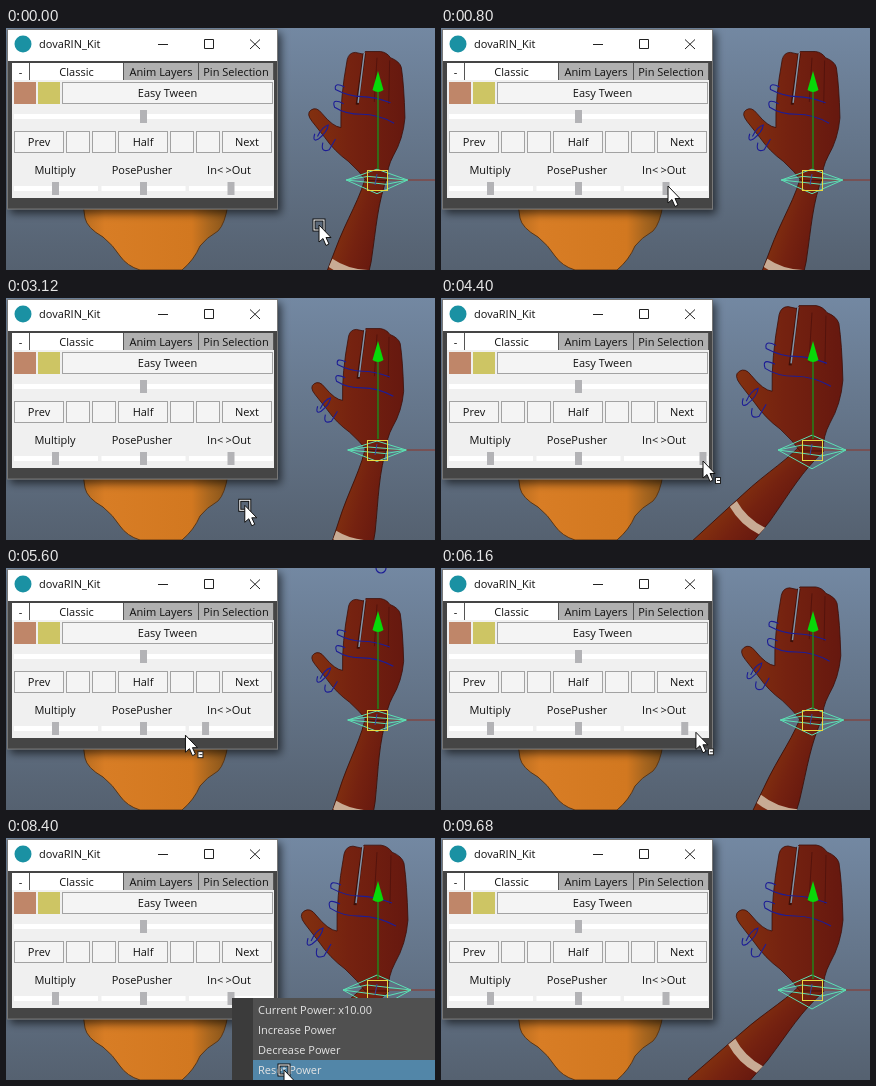
These frames come from a looping animation (429 by 242 pixels, 9.76 s). An HTML page:

```html
<!DOCTYPE html>
<html lang="en">
<head>
<meta charset="utf-8">
<title>Pose slider</title>
<style>
html, body { margin: 0; width: 100%; height: 100%; overflow: hidden; background: #64748a; }
svg { display: block; width: 100vw; height: 100vh; }
text { font: 11px "Open Sans", "Noto Sans", sans-serif; fill: #111; }
#labels text { text-anchor: middle; }
#menu text { fill: #e4e4e4; }
#hand path, #gizmo path { vector-effect: non-scaling-stroke; }
.limb { fill: url(#skin); stroke: #3c0f08; stroke-width: .8; }
.line { fill: none; }
</style>
</head>
<body>
<svg viewBox="0 0 429 242">
  <defs>
    <linearGradient id="sky" x2="0" y2="1">
      <stop stop-color="#7388a2"/><stop offset="1" stop-color="#556170"/>
    </linearGradient>
    <linearGradient id="skin">
      <stop stop-color="#82300f"/><stop offset=".45" stop-color="#752210"/><stop offset="1" stop-color="#66180f"/>
    </linearGradient>
    <linearGradient id="face">
      <stop stop-color="#b86c20"/><stop offset=".15" stop-color="#d87d25"/>
      <stop offset=".75" stop-color="#d27820"/><stop offset=".87" stop-color="#a8661f"/><stop offset="1" stop-color="#85531a"/>
    </linearGradient>
    <filter id="shadow" x="-10%" y="-10%" width="125%" height="125%">
      <feDropShadow dx="3" dy="4" stdDeviation="4" flood-opacity=".6"/>
    </filter>
  </defs>
  <rect width="429" height="242" fill="url(#sky)"/>

  <path d="M77 176L79 190Q81 200 97 209Q107 217 114 228Q121 238 134 242H176Q188 232 194 218Q200 210 212 203Q219 196 222 176Z"
    fill="url(#face)" stroke="#5c3715"/>

  <g id="arm">
    <path class="limb" d="M-11 -8C-9 22 -17 45 -19 80L-24 150H24L19 80C14 45 8 22 10 -8Z"/>
    <path d="M-19 88Q0 94 20 88L20 97Q0 103 -20 97Z" fill="#c8ab94"/>
  </g>
  <g id="hand">
    <path class="limb" d="M359 153Q352 143 339 131Q324 120 313 104L299 86Q292 77 298 73Q304 69 310 77Q322 92 331 93
      Q330 60 338 16Q340 8 347 8L356 10L358 7H375Q382 8 386 14Q396 18 398 25Q401 45 402 82Q400 106 389 125Q382 138 382 153Z"/>
    <path class="line" d="M371 14L368 64M385 17L384 66" stroke="#54130c"/>
    <path class="line" d="M357 9L349 67" stroke="#3c0f08" stroke-width="3"/>
    <path class="line" d="M357 8L350 65" stroke="#8394a8" stroke-width="1.5"/>
    <path class="line" stroke="#1c1c96" stroke-width="1.1" d="M335 47Q323 41 325 50Q340 58 354 58T386 65
      M334 66Q320 59 324 70Q336 78 354 78T390 88
      M302 100Q299 110 306 106Q316 98 317 90Q310 92 305 103M311 110Q308 122 318 118L325 106"/>
  </g>
  <circle id="farRing" cx="375" r="5" fill="none" stroke="#1c1c96" stroke-width="1.2"/>

  <path d="M382 152H429" stroke="#8e3429" stroke-width="1.2"/>
  <g id="gizmo" class="line" stroke="#5ce0b4">
    <path d="M-34 0L0 -15L34 0L0 19ZL-10 -5L34 0L10 6Z"/>
  </g>
  <path d="M372 62V141" stroke="#1d8c1c" stroke-width="1.4"/>
  <path d="M372 43L377.500 62Q372 66 366.500 62Z" fill="#08d808"/>
  <path d="M371 146L369 157" stroke="#3346a0"/>
  <rect x="361.500" y="142.500" width="20" height="20" fill="none" stroke="#e8da42"/>

  <rect x="1.500" y="1.500" width="270" height="179.500" fill="#444" stroke="#777" filter="url(#shadow)"/>
  <rect x="2" y="2" width="269" height="31" fill="#fff"/>
  <circle cx="17" cy="16" r="8.500" fill="#1a91a3"/>
  <text x="33" y="20">dovaRIN_Kit</text>
  <path d="M152 16.500H162M198.500 11.500H207.500V20.500H198.500ZM244 11.500L254 21M254 11.500L244 21" fill="none" stroke="#222"/>
  <rect x="6" y="35" width="262" height="135" fill="#f0f0f0"/>
  <g id="labels"></g>
  <rect id="thumb" y="154" width="7" height="13" fill="#b3b3b6"/>

  <g id="menu">
    <rect x="226" y="160" width="203" height="82" fill="#505050"/>
    <rect x="226" y="160" width="21" height="82" fill="#3b3b3b"/>
    <rect id="hover" x="247" width="182" height="20" fill="#5286a8"/>
    <text x="252" y="176">Current Power: x10.00</text>
    <text x="252" y="196">Increase Power</text>
    <text x="252" y="216">Decrease Power</text>
    <text x="252" y="236">Reset Power</text>
  </g>

  <g id="cursor">
    <g id="selectBox" fill="none">
      <rect x="-5" y="-5" width="10" height="10" stroke="#111" stroke-width="3"/>
      <rect x="-5" y="-5" width="10" height="10" stroke="#fff"/>
    </g>
    <path d="M0 0V17L4 13.500L7 20.500L10 19L7 12.500H12Z" fill="#fff" stroke="#111"/>
    <g id="dragBadge">
      <rect x="12.500" y="16.500" width="5" height="6" fill="#fff" stroke="#222"/>
      <path d="M14 19.500H17" stroke="#222"/>
    </g>
  </g>
</svg>
<script>
const el = Object.fromEntries([...document.querySelectorAll("[id]")].map(e => [e.id, e]));
const LOOP = 9760, STEP = 80, CENTER = 225, REACH = 38, LAG = 40, MOVE = 480;

// Cursor stops: arrival time, x, y. It waits at each stop until the next move must begin.
const stops = [
  [0,313,197], [720,227,158], [1280,164,166], [1760,210,166], [2080,166,168], [3040,240,212], [3480,226,158],
  [4240,262,163], [5000,129,168], [5400,250,166], [5760,129,168], [6240,265,164], [6520,172,166], [6760,270,165],
  [7240,226,160], [7740,278,232], [8880,226,160], [9120,180,165], [9400,240,165], [9680,440,262]
];
// Each drag pulls the pose from where it was towards 0 (left) or 1 (right).
const drags = [
  { start: 880, end: 2560, from: .3, power: 1 },
  { start: 3600, end: 6760, from: 0, power: 1 },
  { start: 8880, end: 9440, from: 1, power: .3 }
];

const mix = (a, b, k) => a + (b - a) * k;
const clamp = (v, low, high) => Math.min(high, Math.max(low, v));
const show = (node, on) => node.style.display = on ? "" : "none";
const place = (node, transform) => node.setAttribute("transform", transform);

function cursorAt(t) {
  const i = stops.findIndex(stop => stop[0] > t);
  if (i < 0) return stops.at(-1).slice(1);
  const [a, b] = [stops[i - 1], stops[i]];
  const u = Math.max(0, 1 - (b[0] - t) / Math.min(MOVE, b[0] - a[0]));
  const k = u * u * (3 - 2 * u);
  return [mix(a[1], b[1], k), mix(a[2], b[2], k)];
}

function dragAt(t) {
  const drag = drags.findLast(d => d.start <= t);
  if (!drag) return { pose: drags[0].from, slider: CENTER, active: false };
  const [x] = cursorAt(Math.min(t, drag.end) - LAG);
  const u = clamp((x - CENTER) / REACH, -1, 1);
  return {
    pose: mix(drag.from, u < 0 ? 0 : 1, Math.abs(u) * drag.power),
    slider: t < drag.end + STEP ? CENTER + u * REACH : CENTER,
    active: t <= drag.end
  };
}

const add = svg => el.labels.insertAdjacentHTML("beforeend", svg);
const box = (x, y, w, h, fill, stroke = "none") =>
  add(`<rect x="${x}" y="${y}" width="${w}" height="${h}" fill="${fill}" stroke="${stroke}"/>`);
const label = (text, x, y) => add(`<text x="${x}" y="${y}">${text}</text>`);

function button(text, x, y, width) {
  box(x + .5, y + .5, width - 1, 21, "#f4f4f4", "#a2a2a2");
  label(text, x + width / 2, y + 15);
}
function tab(text, x, width, fill) {
  box(x, 35, width, 17, fill);
  box(x + width, 35, 1, 17, "#555");
  label(text, x + width / 2, 48);
}
function slider(x, y, width, thumbX) {
  box(x, y + 4, width, 5, "#fff");
  if (thumbX) box(thumbX, y, 7, 13, "#b3b3b6");
}

tab("-", 6, 17, "#fff");
tab("Classic", 24, 93, "#fff");
tab("Anim Layers", 118, 74, "#b0b0b0");
tab("Pin Selection", 193, 74, "#b0b0b0");
box(8, 54, 22, 22, "#bf8669");
box(32, 54, 22, 22, "#cdc564");
button("Easy Tween", 56, 54, 211);
slider(8, 82, 259, 134);

let left = 8;
for (const text of ["Prev", "", "", "Half", "", "", "Next"]) {
  const width = text ? 50 : 24;
  button(text, left, 103, width);
  left += width + 2;
}
["Multiply", "PosePusher", "In&lt;&#8201;&gt;Out"].forEach((text, i) => {
  label(text, 49 + 87 * i, 146);
  slider(8 + 87.5 * i, 154, 84, i < 2 && 46 + 88 * i);
});

function draw(t) {
  const [x, y] = cursorAt(t);
  const { pose, slider, active } = dragAt(t);

  // The hand is foreshortened when lowered; the forearm swings around the wrist.
  place(el.hand, `translate(371 150) scale(${mix(.86, 1, pose)} ${mix(.835, 1, pose)}) translate(-371 -150)`);
  place(el.arm, `translate(370 152) rotate(${mix(14, 45, pose * pose)})`);
  place(el.gizmo, `translate(371 152) scale(${mix(.86, 1, pose)} ${mix(.6, 1, pose)})`);
  el.farRing.setAttribute("cy", mix(0, -60, pose));
  show(el.farRing, t > drags[1].start + MOVE);
  el.thumb.setAttribute("x", slider - 3.5);

  const menuOpen = t >= 7240 && t < 8480;
  const row = Math.floor((y - 162) / 20);
  show(el.menu, menuOpen);
  show(el.hover, x > 240 && row >= 0);
  el.hover.setAttribute("y", 162 + 20 * row);

  place(el.cursor, `translate(${x} ${y})`);
  show(el.dragBadge, active);
  show(el.selectBox, !active && (x > 271 || y > 181 || menuOpen));
}

function tick(now) {
  draw(Math.floor(now % LOOP / STEP) * STEP);
  requestAnimationFrame(tick);
}
tick(performance.now());
</script>
</body>
</html>
```
